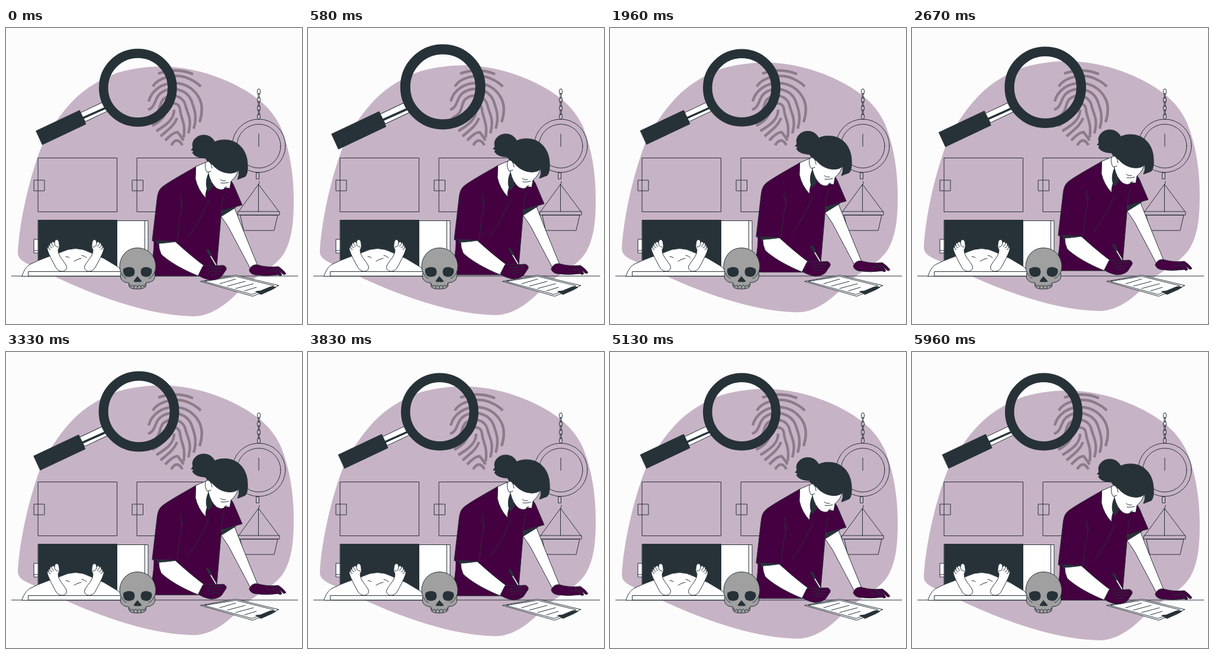
These frames come from a looping animation (500 by 500 pixels, 6 s). An HTML page:

```html
<!DOCTYPE html>
<html lang="en">
<head>
<meta charset="utf-8">
<title>Forensic examiner</title>
<style>
html, body { margin: 0; width: 100%; height: 100%; overflow: hidden; background: #fcfcfc; }
svg { display: block; width: 100%; height: 100%; fill: none; stroke: #263238; stroke-linecap: round; stroke-linejoin: round; }
.dark { fill: #263238; }
.white { fill: #fff; }
.purple { fill: #450041; }
.flat { stroke: none; }
</style>
</head>
<body>
<svg viewBox="0 0 500 500">
  <defs>
    <g id="foot">
      <path class="white" d="M70 375C73 384 79 395 84 404Q88 412 97 411Q104 408 102 402C98 393 88 386 88 375Q91 370 90 366Q90 360 87 357.500Q82 357 82 363Q79 359 77 363Q74 362 74 367Q71 366 72 370Q69 370 70 375Z"/>
      <path d="M72 370Q72 375 75 374M74 367Q75 372 78 371M77 363Q78 369 81 369M82 363Q82 370 88 370"/>
    </g>
  </defs>

  <path id="blob" class="flat" fill="#c7b3c6" d="M20 380C22 335 36 265 57 208C68 181 89 148 113 123C134 101 164 84 190 75C215 68 240 65 265 65C310 66 350 78 385 95C420 112 450 135 465 170C480 208 486 250 486 290C486 325 484 355 470 380C454 406 422 418 400 438C378 462 350 487 316 487C260 486 200 468 150 449C110 434 75 416 45 402C30 396 20 390 20 380Z"/>

  <!-- drawers -->
  <path d="M54.500 219.500H187.500V310.500H54.500ZM47.500 257H65V275H47.500ZM221.500 219.500H354V310.500H221.500ZM213.500 257H231.500V275H213.500Z"/>
  <path class="white" d="M47.500 357H56V380H47.500ZM187.500 325.500H240V419H187.500Z"/>
  <path d="M47.500 376H55M234.500 325.500V419"/>
  <path class="dark" d="M54.500 324.500H187.500V412H54.500Z"/>

  <!-- scale -->
  <g>
    <circle cx="427" cy="199" r="45"/>
    <circle cx="427" cy="199.500" r="37"/>
    <path d="M427 179V200M423 244.500H427.500V255H423ZM428 259Q428 264 426.500 264L393 310M426.500 264L461 310M426.500 264V310M392 310H462V316H392ZM396 316H459L453 342H402Z"/>
    <g id="chain"></g>
  </g>

  <g stroke="#8c7b89" stroke-width="4.400" stroke-linecap="butt">
    <path d="M257 77Q288 66 316 78M248 99C258 82 290 76 310 86Q323 92 329 99"/>
    <path d="M241 124C246 105 264 93 284 93C306 93 321 106 328 122Q334 138 327 159"/>
    <path d="M240 138C254 134 250 116 264 108C284 97 306 106 313 122C317 134 324 148 317 170"/>
    <path d="M243 152C264 144 257 128 266 120C280 109 299 115 303 130C306 144 315 153 308 178"/>
    <path d="M247 165C273 152 268 140 275 132C282 124 293 127 294 138C295 152 304 160 300 185"/>
    <path d="M254 174C272 163 284 154 284 138M261 183C275 171 284 165 289 152"/>
    <path d="M269 190Q282 176 290 176Q295 182 300 190M279 198Q289 182 298 198"/>
  </g>

  <g id="lens">
    <path class="white" d="M126 143L164 125L172 140L134 158Z"/>
    <path d="M130 152L168 135" stroke-width="3.500"/>
    <circle cx="222.500" cy="101" r="57.700" stroke-width="15.500"/>
    <path class="dark" d="M51.500 173.500L124.500 139L135 162L62 196.500Z"/>
  </g>

  <path d="M9.500 419H493"/>

  <!-- covered body -->
  <path class="white" d="M27 419C30 410 34 403 41 399C57 391 75 385 92 379Q118 366 142 379L165 389L190 404L196 411V419Z"/>
  <path class="white" d="M38 411.500H196V419H38Z"/>
  <path d="M115 394Q121 390 127 389M101 386Q104 386 107 388M128 384Q133 385 136 388"/>
  <use href="#foot"/>
  <use href="#foot" transform="matrix(-1 0 0 1 235 0)"/>

  <!-- clipboard -->
  <path class="white" d="M329 428L388 417.500L461 435L417 453Z"/>
  <path d="M335 428L388 419.500L453 435.500L416 450Z"/>
  <path d="M361 432L388 424M374 436L404 428M388 440L418 432M403 444L423 438"/>
  <path class="dark" d="M422 445L430 444L447 437L456 438L449 442L431 450Z"/>

  <g id="person">
    <path class="white" d="M363 318L386 304C394 325 410 365 425 401L414 409C402 386 388 360 376 337Q369 326 363 318Z"/>
    <path class="purple" d="M411 409C413 402 420 398 428 401C440 404 450 404 460 403Q468 408 473 415Q471 418 468 416L462 410L466 417Q463 420 460 417Q439 420 420 417Q412 415 411 409Z"/>
    <path d="M440 410L456 411L461 417M449 407L462 410"/>
    <path class="dark" d="M362 319L367 304L388 303Z"/>
    <path class="purple" d="M321 234C304 244 280 257 266 267C257 273 256 282 255 290L247 359L250 361C250 380 246 400 242 419H330L356 402L364 309L399 299L384 264Q380 256 374 253L345 232Z"/>
    <path class="dark" d="M255 360L287 361L268 365L257 366Z"/>
    <path class="white" d="M258 364Q273 363 286 361C296 370 315 387 334 401L325 419C300 409 275 395 262 382Q258 373 258 364Z"/>
    <path d="M247 359L289 361L294 318Q300 303 293 290M294 282Q299 294 297 304M343 291C334 309 324 333 306 354M369 280Q364 293 364 309"/>
    <path class="white" d="M321 234L342 225L350 260L343 264Q337 274 337 287Q324 273 320 255Z"/>
    <path class="dark" d="M342 246C337 257 337 269 342 276L349 268Z"/>
    <path class="white" d="M345 226L393 237Q391 250 380 259L378 271L370 270Q366 276 356 271Q346 263 342 246Z"/>
    <path d="M362 256Q367 260 371 258M363 262Q368 263 376 261M369 270L373 268"/>
    <path class="dark" d="M337 220C333 202 350 189 369 189C392 189 407 206 408 230Q409 246 404 251L391 256Q395 248 393 240C385 249 362 247 349 231L341 226Z"/>
    <path class="dark" d="M313 206Q317 203 315 198C315 188 324 181 334 181C345 181 354 189 354 200C354 213 346 220 335 220Q320 219 315 211L317 208Z"/>
    <path class="white" d="M348 237C347 228 342 222 337 228Q335 237 340 244L346 242"/>
    <path class="purple" d="M333 402Q340 400 347 402L367 401Q373 403 372 408L364 420Q357 426 346 426Q334 424 325 418Z"/>
    <path d="M340 408Q353 404 366 406M341 413Q352 409 364 411M344 418Q352 414 360 416"/>
    <path d="M341 376L355 401" stroke-width="3.200"/>
    <path d="M346 386L354.500 400" stroke="#fff" stroke-width="1.500"/>
    <path d="M340.500 375.500L345 383" stroke-width="4"/>
  </g>

  <!-- skull -->
  <path fill="#a0a0a0" d="M222 371.500C240 371.500 252 384 253 402Q253 408 251 413Q253 421 249 426Q243 431 237 430L236 437Q232 441 222 441Q211 441 208 437L207 430Q200 431 195 425Q192 421 194 413Q192 408 192 402C193 384 205 371.500 222 371.500Z"/>
  <path class="dark" d="M199 407Q207 402 215 406Q219 412 215 418Q207 422 201 418Q197 412 199 407ZM245 407Q237 402 230 406Q226 412 230 418Q238 422 243 418Q248 412 245 407ZM222 420Q218 424 216 428L221 429L222 426L223 429L229 428Q226 424 222 420Z"/>
  <path d="M208 432L211 437Q214 432 216 437Q219 432 222 437Q225 432 228 437Q231 432 233 437L236 432M216 437V440M222 437V440M228 437V440M195 414Q198 421 203 423M250 414Q247 421 241 423"/>
</svg>
<script>
const get = id => document.getElementById(id);
const LOOP = 6000;
const LEAD = 35;
const beat = [[0, 1], [.1, 1.1], [.3, 1], [.4, 1], [.5, 1.1], [.6, 1], [1, 1]];

get('chain').innerHTML = Array.from({ length: 7 }, (_, i) => {
  const w = i % 2 ? 2 : 5;
  return `<rect x="${427 - w / 2}" y="${103 + i * 7}" width="${w}" height="9" rx="${w / 2}"/>`;
}).join('');

function pulse(p) {
  const i = beat.findIndex(k => k[0] > p);
  const [a, from] = beat[i - 1], [b, to] = beat[i];
  return from + (to - from) * (p - a) / (b - a);
}

function draw() {
  const p = (performance.now() + LEAD) % LOOP / LOOP;
  const lift = -10 * (1 - Math.abs(1 - 2 * p));
  for (const id of ['blob', 'person']) get(id).setAttribute('transform', `translate(0 ${lift})`);
  get('lens').setAttribute('transform', `translate(169.5 116.5) scale(${pulse(p)}) translate(-169.5 -116.5)`);
  requestAnimationFrame(draw);
}
draw();
</script>
</body>
</html>
```
